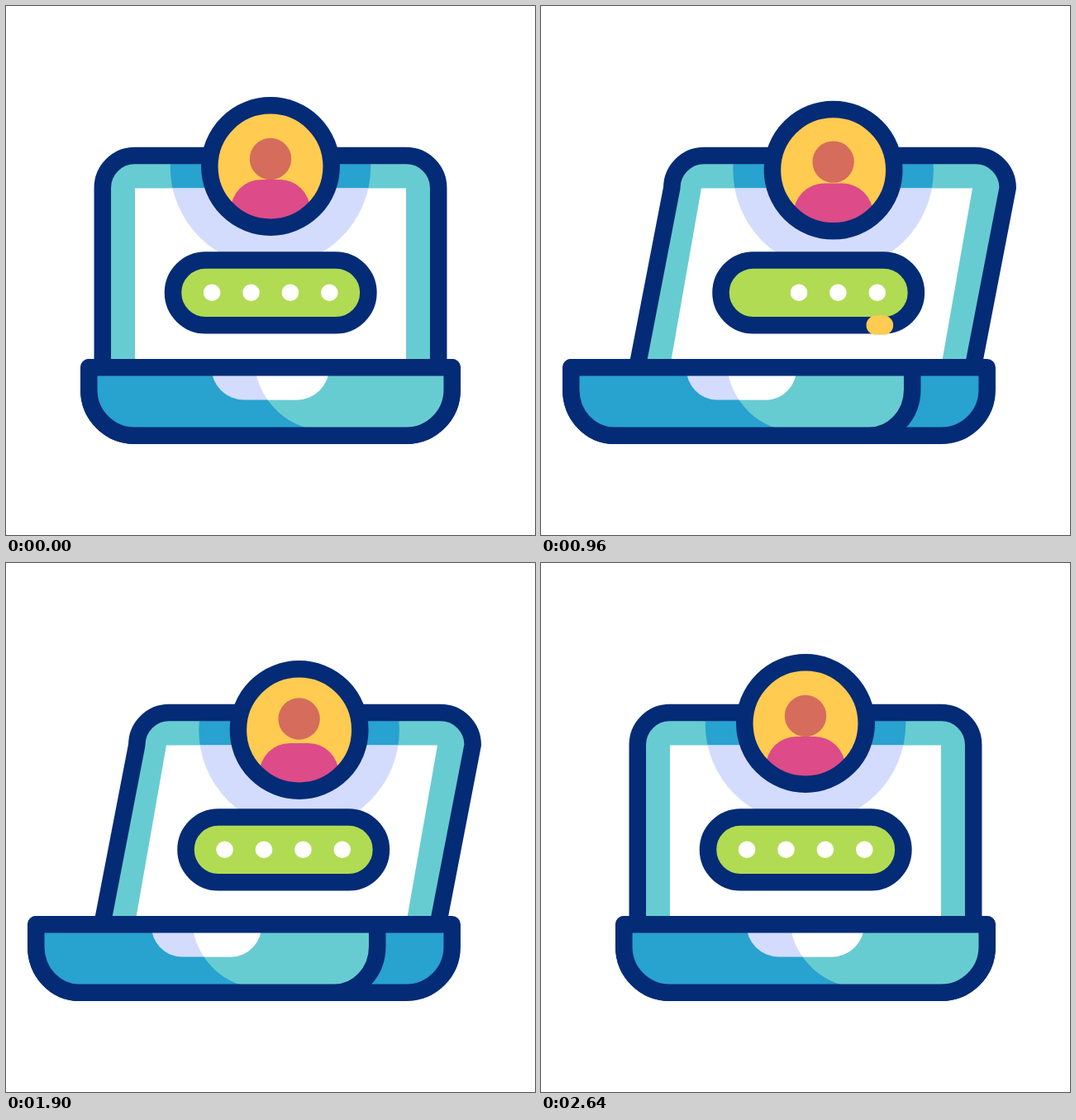
Write an HTML page with a canvas that moves like this. It is 640x640 px and loops after 3000 ms.

```html
<!DOCTYPE html>
<html lang="en">
<head>
<meta charset="utf-8">
<title>Login laptop</title>
<style>
  html, body { margin: 0; width: 100%; height: 100%; overflow: hidden; background: #fff; }
  canvas { display: block; width: 640px; height: 640px; }
</style>
</head>
<body>
<canvas id="stage" width="640" height="640"></canvas>
<script>
const ctx = document.getElementById('stage').getContext('2d');
const LOOP = 3000;
const LINE = 20.5;
const NAVY = '#042b76', TEAL = '#67ccd1', BLUE = '#28a2cf', LILAC = '#d3dcfd',
      GREEN = '#b1db52', YELLOW = '#ffcb50', SKIN = '#d56c5c', PINK = '#dd4b88', WHITE = '#fff';

// Eased progress from 0 to 1 between two times.
function ease(t, from, to) {
  const x = Math.min(1, Math.max(0, (t - from) / (to - from)));
  return x * x * (3 - 2 * x);
}

function fill(path, color) {
  ctx.fillStyle = color;
  ctx.fill(path);
}

function stroke(path, color, width = LINE) {
  ctx.strokeStyle = color;
  ctx.lineWidth = width;
  ctx.stroke(path);
}

function disc(x, y, r) {
  const path = new Path2D();
  path.arc(x, y, r, 0, Math.PI * 2);
  return path;
}

function clipped(path, draw) {
  ctx.save();
  ctx.clip(path);
  draw();
  ctx.restore();
}

function drawSparks(t) {
  const inner = 75 + 67 * ease(t, 1320, 1800);
  const outer = 75 + 67 * ease(t, 1200, 1700);
  if (outer - inner < 0.5) return;
  const rays = new Path2D();
  for (const degrees of [195, 225, 255]) {
    const a = degrees * Math.PI / 180;
    rays.moveTo(201 + inner * Math.cos(a), 223 + inner * Math.sin(a));
    rays.lineTo(201 + outer * Math.cos(a), 223 + outer * Math.sin(a));
  }
  stroke(rays, YELLOW, 19.5);
}

function drawScreen(open, halo) {
  const shift = 41.5 * open;
  const left = 116.8 + shift, right = 523.2 + shift;
  const frame = new Path2D();
  frame.moveTo(116.8, 435);
  frame.lineTo(left, 220);
  frame.arc(left + 39, 220, 39, Math.PI, Math.PI * 1.5);
  frame.arc(right - 39, 220, 39, Math.PI * 1.5, Math.PI * 2);
  frame.lineTo(523.2, 435);

  const tilt = 38 * open;
  const panel = new Path2D();
  panel.moveTo(156, 437);
  panel.lineTo(156 + tilt, 220.5);
  panel.lineTo(484 + tilt, 220.5);
  panel.lineTo(484, 437);

  clipped(frame, () => {
    fill(frame, TEAL);
    fill(halo, BLUE);
    fill(panel, WHITE);
    clipped(panel, () => fill(halo, LILAC));
  });
  stroke(frame, NAVY);
}

function drawAvatar(t, x, y) {
  const face = disc(x, y, 73.7);
  const nod = 20.7 * (ease(t, 880, 1480) - ease(t, 1480, 2080));
  const body = new Path2D();
  body.roundRect(x - 48, y + 16, 96, 90, 37);
  fill(face, YELLOW);
  clipped(face, () => {
    fill(disc(x, y - 9 - nod, 25.2), SKIN);
    fill(body, PINK);
  });
  stroke(face, NAVY);
}

function drawPassword(t, open) {
  const cx = 320.2 + 15.5 * open, cy = 346.8, r = 39.4, half = 78.8;
  const pill = new Path2D();
  pill.moveTo(cx + half, cy + r);
  pill.lineTo(cx - half, cy + r);
  pill.arc(cx - half, cy, r, Math.PI / 2, Math.PI * 1.5);
  pill.lineTo(cx + half, cy - r);
  pill.arc(cx + half, cy, r, -Math.PI / 2, Math.PI / 2);
  fill(pill, GREEN);
  stroke(pill, NAVY);

  const length = 4 * half + 2 * Math.PI * r;
  const start = length * ease(t, 1100, 1900);
  const end = length * ease(t, 900, 1700);
  if (end - start > 0.5) {
    ctx.save();
    ctx.setLineDash([end - start, length * 2]);
    ctx.lineDashOffset = -start;
    stroke(pill, YELLOW, 23.3);
    ctx.restore();
  }

  for (let i = 0; i < 4; i++) {
    const out = 840 + i * 160, back = out + 380;
    const size = 1 - ease(t, out, out + 100) + ease(t, back, back + 100);
    if (size > 0.01) fill(disc(cx + (i - 1.5) * 47.4, cy, 10.3 * size), WHITE);
  }
}

// A tray with rounded lower corners; rx is the horizontal corner radius.
function tray(left, right, rxLeft, rxRight) {
  const top = 437.3, bottom = 519.8, ry = 55.6;
  const path = new Path2D();
  path.moveTo(left, top);
  path.lineTo(right, top);
  path.lineTo(right, bottom - ry);
  path.ellipse(right - rxRight, bottom - ry, rxRight, ry, 0, 0, Math.PI / 2);
  path.ellipse(left + rxLeft, bottom - ry, rxLeft, ry, 0, Math.PI / 2, Math.PI);
  path.closePath();
  return path;
}

function drawBase(open) {
  const x0 = 100.3, x1 = 539.7;
  const left = x0 - 64 * open, right = x1 - 90.5 * open;
  const squeeze = (right - left) / (x1 - x0);
  const rx = 55.6 * squeeze;
  const back = tray(left, x1, rx, 55.6);
  const front = tray(left, right, rx, rx);

  fill(back, BLUE);
  stroke(back, NAVY);
  fill(front, BLUE);

  const shine = new Path2D();
  shine.moveTo(301, 437);
  shine.arc(388.4, 426, 87.9, Math.PI - 0.125, Math.PI / 2, true);
  shine.lineTo(388.4, 530);
  shine.lineTo(560, 530);
  shine.lineTo(560, 437);
  shine.closePath();
  const notch = new Path2D();
  notch.roundRect(248.5, 397.5, 142.5, 79, 39.4);

  clipped(front, () => {
    ctx.translate(left - x0 * squeeze, 0);
    ctx.scale(squeeze, 1);
    fill(shine, TEAL);
    fill(notch, LILAC);
    clipped(shine, () => fill(notch, WHITE));
  });
  stroke(front, NAVY);
}

function draw(t) {
  const open = ease(t, 200, 800) - ease(t, 2000, 2600);
  const rise = ease(t, 800, 1400);
  const hop = rise - ease(t, 1400, 2000);
  const x = 320 + open * (33.4 + 1.2 * rise);
  const y = 194 + 10.3 * open - 32 * hop;

  ctx.fillStyle = WHITE;
  ctx.fillRect(0, 0, 640, 640);
  ctx.lineCap = ctx.lineJoin = 'round';
  drawSparks(t);
  drawScreen(open, disc(x, y, 121.3));
  drawAvatar(t, x, y);
  drawPassword(t, open);
  drawBase(open);
}

const began = performance.now();
function tick() {
  draw((performance.now() - began) % LOOP);
  requestAnimationFrame(tick);
}
tick();
</script>
</body>
</html>
```
